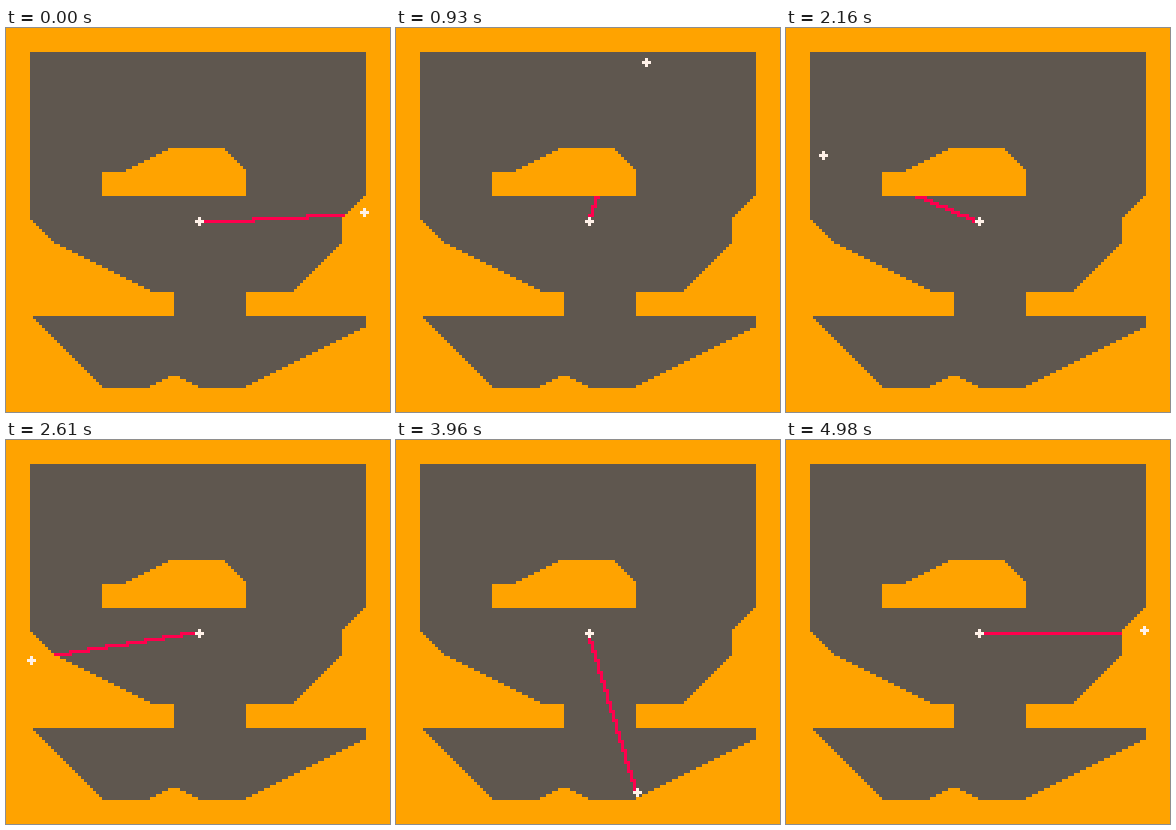
These frames come from a looping animation (384x384 px, 5010 ms). An HTML page with a canvas:

```html
<!DOCTYPE html>
<html lang="en">
<head>
<meta charset="utf-8">
<title>Ray cast</title>
<style>
  html, body { margin: 0; width: 100%; height: 100%; overflow: hidden; background: #ffa300; }
  canvas { display: block; width: 100vw; height: 100vh; image-rendering: pixelated; }
</style>
</head>
<body>
<canvas width="128" height="128"></canvas>
<script>
const SIZE = 128, CENTER = 64, RADIUS = 56;
const FRAME_MS = 30, FRAMES = 167;
const START_TURN = 0.00785, TURN_STEP = 392 / 65536;
const ORANGE = '#ffa300', GREY = '#5f574f', RED = '#ff004d', WHITE = '#fff1e8';

const ctx = document.querySelector('canvas').getContext('2d');
const floor = new Uint8Array(SIZE * SIZE);

// Bands: top, bottom, left edge, its shift per row, right edge, its shift per row
const rooms = [
  [8, 56, 8, 0, 120, 0],
  [56, 64, 8, 0, 119, -1],
  [64, 72, 9, 1, 112, 0],
  [72, 88, 18, 2, 111, -1],
  [88, 96, 56, 0, 80, 0],
  [96, 100, 9, 1, 120, 0],
  [100, 120, 13, 1, 118, -2],
];
const blocks = [
  [40, 48, 54, -2, 73, 1],
  [48, 56, 32, 0, 80, 0],
  [116, 120, 54, -2, 58, 2],
];

function carve(bands, value) {
  for (const [top, bottom, left, dl, right, dr] of bands) {
    for (let y = top; y < bottom; y++) {
      const i = y - top;
      floor.fill(value, y * SIZE + left + dl * i, y * SIZE + right + dr * i);
    }
  }
}

function dot(x, y, color) {
  ctx.fillStyle = color;
  ctx.fillRect(x, y, 1, 1);
}

function cross(x, y) {
  ctx.fillStyle = WHITE;
  ctx.fillRect(x - 1, y, 3, 1);
  ctx.fillRect(x, y - 1, 1, 3);
}

// Walk the grid one edge at a time until a wall or the end point
function castRay(endX, endY) {
  const dx = endX - CENTER, dy = endY - CENTER;
  const stepX = 1 / Math.abs(dx), stepY = 1 / Math.abs(dy);
  let x = CENTER, y = CENTER, nextX = stepX, nextY = stepY;
  for (let n = Math.abs(dx) + Math.abs(dy); n >= 0 && floor[y * SIZE + x]; n--) {
    dot(x, y, RED);
    if (nextX < nextY) {
      x += Math.sign(dx);
      nextX += stepX;
    } else {
      y += Math.sign(dy);
      nextY += stepY;
    }
  }
}

function drawRoom() {
  ctx.fillStyle = ORANGE;
  ctx.fillRect(0, 0, SIZE, SIZE);
  floor.forEach((free, i) => {
    if (free) dot(i % SIZE, Math.floor(i / SIZE), GREY);
  });
}

carve(rooms, 1);
carve(blocks, 0);
drawRoom();
const room = ctx.getImageData(0, 0, SIZE, SIZE);

const toPixel = v => Math.floor(CENTER + RADIUS * v + 4e-4);

function draw(now) {
  const frame = Math.floor(now / FRAME_MS) % FRAMES;
  const angle = 2 * Math.PI * (START_TURN + frame * TURN_STEP);
  const x = toPixel(Math.cos(angle)), y = toPixel(-Math.sin(angle));
  ctx.putImageData(room, 0, 0);
  castRay(x, y);
  cross(CENTER, CENTER);
  cross(x, y);
}

let start;
function tick(now) {
  start ??= now;
  draw(now - start);
  requestAnimationFrame(tick);
}
draw(0);
requestAnimationFrame(tick);
</script>
</body>
</html>
```
